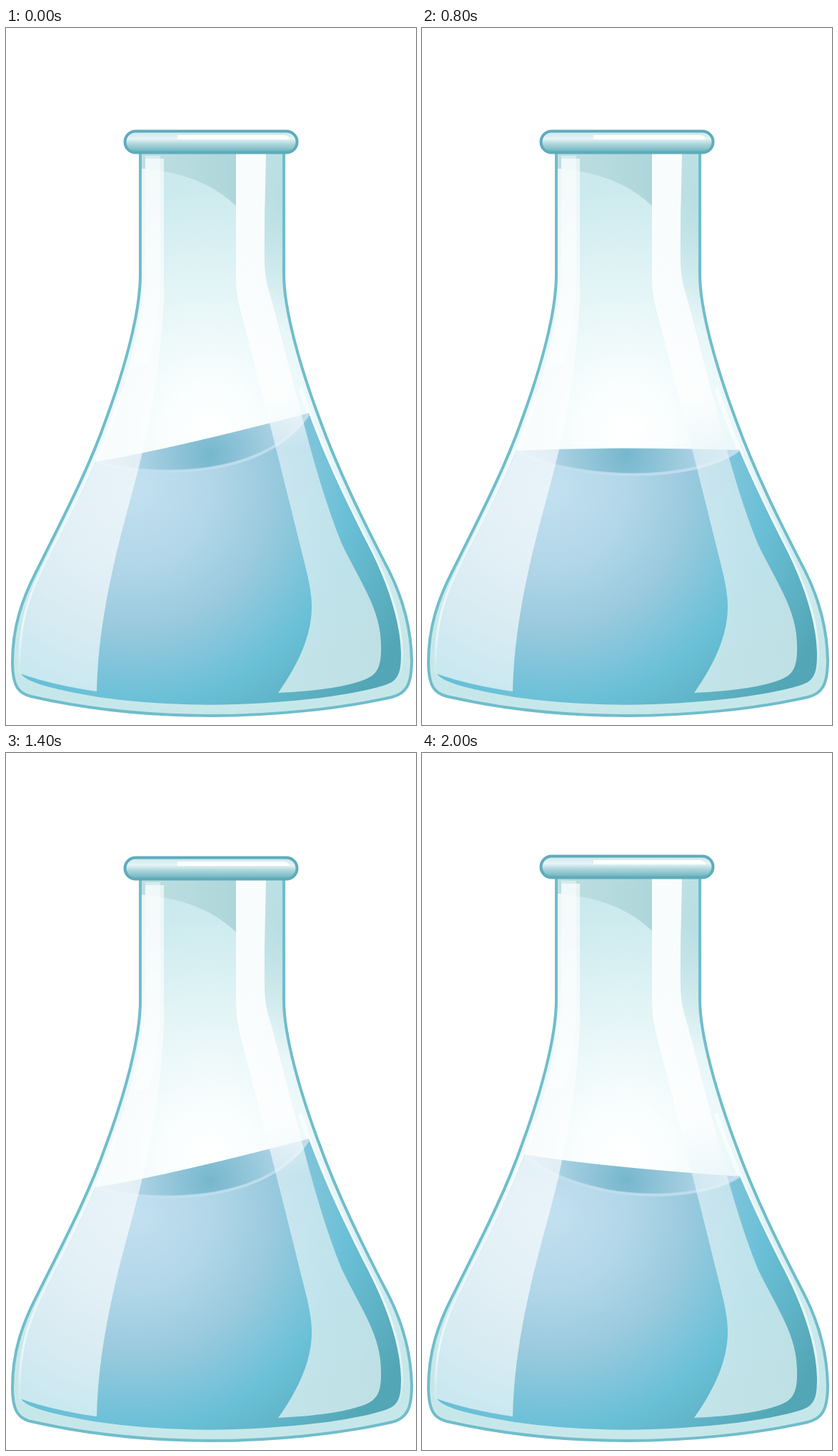
An HTML page for the animation above (2200 ms loop, 574 px wide and 976 px high).

```html
<!DOCTYPE html>
<html lang="en">
<head>
<meta charset="utf-8">
<title>Sloshing flask</title>
<style>
html, body { margin: 0; width: 100%; height: 100%; overflow: hidden; background: #fff; }
svg { display: block; width: 100vw; height: 100vh; }
</style>
</head>
<body>
<svg viewBox="0 0 574 976">
  <defs>
    <radialGradient id="glassFill" gradientUnits="userSpaceOnUse" cx="285" cy="560" r="410">
      <stop offset="0" stop-color="#fff"/>
      <stop offset=".14" stop-color="#fafefe"/>
      <stop offset=".5" stop-color="#e2f4f6"/>
      <stop offset=".8" stop-color="#cdebee"/>
      <stop offset="1" stop-color="#c6e7ea"/>
    </radialGradient>
    <radialGradient id="liquidFill" gradientUnits="userSpaceOnUse" cx="180" cy="645" r="425">
      <stop offset="0" stop-color="#c3e0f0"/>
      <stop offset=".25" stop-color="#b2d7e9"/>
      <stop offset=".45" stop-color="#9bcade"/>
      <stop offset=".7" stop-color="#6ac0d7"/>
      <stop offset="1" stop-color="#53a6b5"/>
    </radialGradient>
    <radialGradient id="surfaceFill" gradientUnits="userSpaceOnUse" cx="286" cy="598" r="160">
      <stop offset="0" stop-color="#76b7cd"/>
      <stop offset=".6" stop-color="#a9d1e3"/>
      <stop offset="1" stop-color="#c6dfee"/>
    </radialGradient>
    <linearGradient id="rimFill" x2="0" y2="1">
      <stop offset="0" stop-color="#c9e6ea"/>
      <stop offset=".35" stop-color="#e6f4f6"/>
      <stop offset=".6" stop-color="#acd6dc"/>
      <stop offset="1" stop-color="#68afbb"/>
    </linearGradient>
    <linearGradient id="shadeFill">
      <stop offset="0" stop-color="#bfdfe2"/>
      <stop offset="1" stop-color="#aed6da"/>
    </linearGradient>
    <radialGradient id="neckSide" gradientUnits="userSpaceOnUse" cx="405" cy="240" r="180">
      <stop offset="0" stop-color="#a8d4d9" stop-opacity=".6"/>
      <stop offset="1" stop-color="#a8d4d9" stop-opacity="0"/>
    </radialGradient>
    <linearGradient id="wallShine" gradientUnits="userSpaceOnUse" x1="0" y1="515" x2="0" y2="915">
      <stop offset="0" stop-color="#fff" stop-opacity=".6"/>
      <stop offset=".8" stop-color="#fff" stop-opacity=".6"/>
      <stop offset="1" stop-color="#fff" stop-opacity="0"/>
    </linearGradient>
    <linearGradient id="glare" gradientUnits="userSpaceOnUse" x1="0" y1="177" x2="0" y2="930">
      <stop offset="0" stop-color="#fff" stop-opacity=".9"/>
      <stop offset=".45" stop-color="#fff" stop-opacity=".75"/>
      <stop offset=".55" stop-color="#edf7fa" stop-opacity=".6"/>
      <stop offset=".8" stop-color="#e0f1f3" stop-opacity=".73"/>
      <stop offset="1" stop-color="#dbf0f0" stop-opacity=".8"/>
    </linearGradient>
    <path id="outline" d="M188 172V345C188 400 165 480 140 548C115 620 75 695 44 758C22 800 9 840 9 888C9 925 20 932 35 936C110 953 200 963 288 963C370 963 465 954 540 937C560 932 568 920 568 885C567 840 555 795 532 752C500 690 465 620 438 545C412 475 389 395 389 345V172"/>
    <path id="inner" d="M160 515C130 610 85 690 56 750C30 800 19 840 20 902C24 915 60 925 130 937C230 951 330 951 440 938C490 931 525 924 540 916C552 908 553 895 553 875C552 825 530 768 505 720C475 660 440 590 412 505"/>
    <clipPath id="innerClip"><use href="#inner"/></clipPath>
  </defs>

  <g id="scene">
    <use href="#outline" fill="url(#glassFill)"/>
    <path d="M362 175H389V345C389 365 393 390 400 420H362Z" fill="url(#neckSide)"/>
    <path d="M190 175H322V249C285 214 240 201 190 197Z" fill="url(#shadeFill)"/>
    <use href="#inner" fill="none" stroke="url(#wallShine)" stroke-width="6"/>

    <g clip-path="url(#innerClip)">
      <path id="body" fill="url(#liquidFill)"/>
      <path id="surface" fill="url(#surfaceFill)"/>
      <path id="lip" fill="none" stroke="#c5e0f0" stroke-width="4" opacity=".8"/>
    </g>

    <path d="M190 197H195V183H221V370C221 425 209 510 195 575C180 655 130 785 127 929Q65 920 20 904C17 840 30 800 56 750C95 670 130 610 160 515C178 460 190 400 190 345Z" fill="#fff" opacity=".64"/>
    <path d="M195 179H216V370Q213 420 200 470L178 470Q194 400 195 345Z" fill="#fff" opacity=".4"/>
    <path d="M322 175H364C363 230 361 290 362 330Q363 355 370 374L412 535C430 605 448 668 470 722C497 778 525 815 525 865C526 900 517 908 495 915C465 925 420 929 381 931C410 890 428 850 428 810C428 780 415 740 405 697L367 545L327 390Q322 370 322 345Z" fill="url(#glare)"/>

    <use href="#outline" fill="none" stroke="#70bdcb" stroke-width="4"/>
    <rect x="166.500" y="144.500" width="241" height="30" rx="15" fill="url(#rimFill)" stroke="#5eacbb" stroke-width="4"/>
    <path d="M240 150H390Q397 152 397 156H240Z" fill="#fff"/>
  </g>
</svg>
<script>
const STEP = 200;

// Surface pose: left tip x, y; right tip x, y; back curve control ys; front curve control ys.
const highRight = [124, 608, 425, 539, 590, 565, 630, 632];
const midLeft = [142, 562, 444, 593, 578, 586, 632, 631];
const bigLeft = [148, 550, 443, 593, 585, 599, 649, 639];
const level = [133, 587, 443, 592, 584, 586, 633, 633];
const lowRight = [130, 597, 444, 591, 590, 589, 639, 640];
const mildRight = [130, 597, 440, 582, 590, 582, 636, 632];
const nearLevel = [131, 592, 444, 591, 587, 588, 636, 637];
const mildLeft = [136, 577, 444, 592, 583, 588, 637, 637];

const poses = [highRight, midLeft, mildRight, level, nearLevel, lowRight,
               mildLeft, highRight, bigLeft, highRight, midLeft];

const el = id => document.getElementById(id);

function draw(step) {
  const [lx, ly, rx, ry, back1, back2, front1, front2] = poses[step];
  const across = part => lx + (rx - lx) * part;
  const front = `M${lx} ${ly}C${across(.28)} ${front1} ${across(.8)} ${front2} ${rx} ${ry}`;
  el("body").setAttribute("d", `${front}L574 ${ry + 5}V976H0V${ly + 5}Z`);
  el("surface").setAttribute("d",
    `${front}C${across(2 / 3)} ${back2} ${across(1 / 3)} ${back1} ${lx} ${ly}Z`);
  el("lip").setAttribute("d", front);

  // The flask is squashed by two pixels, base fixed, during part of the loop.
  const squash = step >= 5 && step < 9 ? 819 / 821 : 1;
  el("scene").setAttribute("transform", `translate(0 964) scale(1 ${squash}) translate(0 -964)`);
}

function tick() {
  draw(Math.floor(performance.now() / STEP) % poses.length);
  requestAnimationFrame(tick);
}
tick();
</script>
</body>
</html>
```
